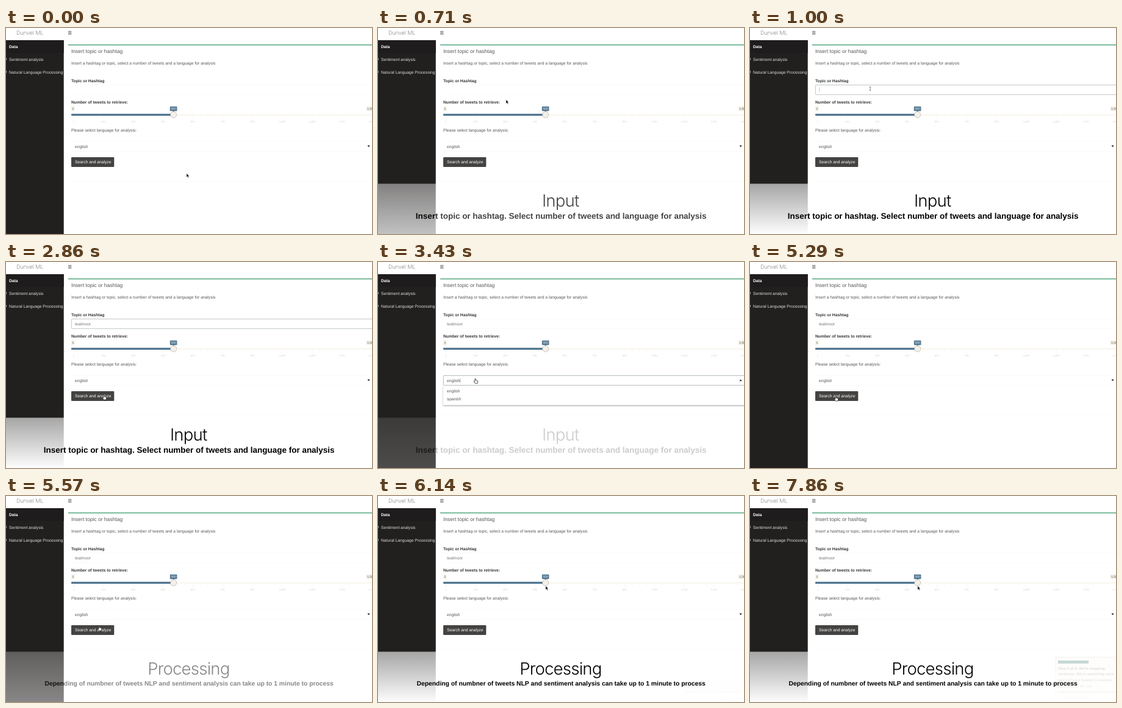
An HTML page that plays this animation: 600 px wide and 338 px high, repeating every 8000 ms.

```html
<!DOCTYPE html>
<html lang="en">
<head>
<meta charset="utf-8">
<title>Topic analysis</title>
<style>
  html, body { margin: 0; width: 100%; height: 100%; overflow: hidden; background: #fff; }
  svg { display: block; width: 100vw; height: 100vh; }
  text { font: 6.73px "Liberation Sans", Arial, sans-serif; fill: #555; text-rendering: geometricPrecision; white-space: pre; }
  .bold { font-weight: 700; fill: #333; }
  .side { fill: #ddd; }
  .tiny { font-size: 5px; }
  .mid { text-anchor: middle; }
  .thin { font-family: Inter, "Open Sans", sans-serif; font-weight: 200; }
  .headline { font-family: Inter, Roboto, sans-serif; font-weight: 300; font-size: 27.5px; letter-spacing: -.75px; fill: #000; text-anchor: middle; }
  .sub { font-weight: 700; fill: #000; text-anchor: middle; }
  .toast text { font-size: 6px; font-weight: 700; fill: #8a8474; }
</style>
</head>
<body>
<svg viewBox="0 0 600 338" preserveAspectRatio="none">
  <defs>
    <linearGradient id="veil" x2="0" y2="1">
      <stop offset="0" stop-color="#fff" stop-opacity=".6"/>
      <stop offset="1" stop-color="#fff" stop-opacity=".99"/>
    </linearGradient>
    <filter id="shadow" x="-5%" y="-20%" width="110%" height="160%">
      <feDropShadow dx="0" dy="1.5" stdDeviation="1.3" flood-opacity=".35"/>
    </filter>
  </defs>

  <rect width="600" height="338" fill="#fff"/>
  <rect y="20" width="94.7" height="318" fill="#22201f"/>
  <rect y="20" width="94.7" height="21" fill="#1e1c1c"/>
  <text class="thin" x="17" y="11.2" style="font-size:9px">Dunvel ML</text>
  <path d="M102 5.7h5.4M102 7.9h5.4M102 10.1h5.4" stroke="#444" stroke-width=".9"/>
  <text class="bold" x="5" y="33" style="fill:#fff">Data</text>
  <text class="side" x="5" y="54">Sentiment analysis</text>
  <text class="side" x="5" y="75">Natural Language Processing</text>
  <path d="M0 49.5v3M0 70.5v3" stroke="#ccc" stroke-width="1.6"/>

  <rect x="102" y="27" width="498" height="1.4" fill="#4ba276"/>
  <text x="107" y="40.6" style="font-size:8.5px">Insert topic or hashtag</text>
  <text x="107" y="59.6">Insert a hashtag or topic, select a number of tweets and a language for analysis</text>
  <path d="M102 252h498M107 93.5h493M107 109h493M107 186.3h493M107 202.3h493" stroke="#faf9f7" stroke-width=".8"/>

  <text class="bold" x="107" y="88.7">Topic or Hashtag</text>
  <rect id="focus" x="107.3" y="93.5" width="500" height="15.8" rx="1" fill="#fff" stroke="#b7c1c0" stroke-width=".9"/>
  <text id="topic" x="113" y="103.6" style="fill:#777"></text>
  <path id="caret" d="M113.5 97.5v7.5" stroke="#aaa" stroke-width=".6"/>

  <text class="bold" x="107" y="124">Number of tweets to retrieve:</text>
  <g id="ticks"></g>
  <rect x="107" y="141.2" width="500" height="2.2" fill="#fdfbf6" stroke="#f3eee2" stroke-width=".5"/>
  <rect x="107" y="140.7" width="168" height="3.2" rx="1" fill="#50758f"/>
  <rect x="107" y="128.7" width="5.6" height="7.6" rx="1" fill="#f1eee4"/>
  <text class="tiny" x="108.4" y="134.4">1</text>
  <rect x="590.5" y="128.7" width="16" height="7.6" rx="1" fill="#f3f0e6"/>
  <text class="tiny" x="592" y="134.4">1,500</text>
  <rect x="268.8" y="128.7" width="11.6" height="7.6" rx="1" fill="#50758f"/>
  <path d="M273.2 136h2.8l-1.4 1.8z" fill="#50758f"/>
  <text class="tiny mid" x="274.6" y="134.4" style="fill:#fff">500</text>
  <circle cx="274.7" cy="142.3" r="5" fill="#f4f1ea" stroke="#bbb7ab" stroke-width=".8"/>

  <text x="107" y="170.3">Please select language for analysis:</text>
  <text x="113" y="196.6">english</text>
  <path id="arrowDown" d="M592.4 192.8h4.4l-2.2 2.5z" fill="#111"/>
  <rect x="107" y="212" width="70.3" height="16" rx="1.2" fill="#444342"/>
  <text x="113" y="222.4" style="fill:#fff">Search and analyze</text>

  <g id="menu">
    <rect x="107" y="202" width="500" height="32.5" fill="#fff" filter="url(#shadow)"/>
    <rect x="107.3" y="186.3" width="500" height="16" rx="1" fill="#fff" stroke="#a9b2b1" stroke-width=".9"/>
    <text x="113" y="196.6">english</text>
    <path d="M134.6 191v7" stroke="#777" stroke-width=".6"/>
    <path d="M592.4 195.2h4.4l-2.2-2.5z" fill="#111"/>
    <text x="113" y="214.4">english</text>
    <text x="113" y="227">spanish</text>
  </g>

  <g id="toast1" class="toast"></g>
  <g id="toast2" class="toast"></g>

  <g id="inputCaption">
    <rect y="255.5" width="600" height="82.5" fill="url(#veil)"/>
    <text class="headline" x="299.2" y="292.6">Input</text>
    <text class="sub" x="300.2" y="313" style="font-size:13.47px">Insert topic or hashtag. Select number of tweets and language for analysis</text>
  </g>
  <g id="processCaption">
    <rect y="255.5" width="600" height="82.5" fill="url(#veil)"/>
    <text class="headline" x="299.4" y="292.6">Processing</text>
    <text class="sub" x="300.2" y="310.6" style="font-size:10.34px">Depending of numbner of tweets NLP and sentiment analysis can take up to 1 minute to process</text>
  </g>

  <g id="cursor">
    <path id="arrow" d="M0 0v6.4l1.5-1.3 1.1 2.4 1.1-.5-1.1-2.3h2z" fill="#000" stroke="#fff" stroke-width=".5"/>
    <path id="beam" d="M-1.4-3q1.4 0 1.4.8q0-.8 1.4-.8M0-2.4v4.8M-1.4 3q1.4 0 1.4-.8q0 .8 1.4.8" fill="none" stroke="#555" stroke-width=".7"/>
    <path id="hand" d="M-1.1-3.4q.7-.9 1.3.1v2.2l2.6.6q.9.3.8 1.4l-.5 3.2h-3.9l-2-2.8q-.3-1 .7-.8l1 .7z" fill="#fff" stroke="#111" stroke-width=".7" stroke-linejoin="round"/>
  </g>
</svg>
<script>
const LOOP = 8000;
const TOPIC = "tealmoor";
const $ = id => document.getElementById(id);
const clamp = v => Math.min(1, Math.max(0, v));
const ease = p => p * p * (3 - 2 * p);
const ramp = (t, from, to) => clamp((t - from) / (to - from));
const show = (id, on) => $(id).style.display = on ? "" : "none";
const within = (v, lo, hi) => v >= lo && v <= hi;

// time, x, y of the pointer
const route = [
  [0, 296, 238.5], [200, 296, 238.5], [860, 197, 99.5], [1860, 197, 99.5],
  [2290, 161, 222], [2900, 161, 222], [3290, 160, 195], [3450, 160, 195],
  [3720, 160, 224], [4150, 160, 224], [4430, 152, 212], [4570, 152, 212],
  [5000, 141, 224], [5500, 141, 224], [5880, 274.8, 147.5], [LOOP, 274.8, 147.5]
];

function pointerAt(t) {
  const i = route.findIndex(([end]) => end > t);
  const [t0, x0, y0] = route[i - 1], [t1, x1, y1] = route[i];
  const p = ease(ramp(t, t0, t1));
  return [x0 + (x1 - x0) * p, y0 + (y1 - y0) * p];
}

function buildTicks() {
  let out = "";
  for (let i = 0; i <= 40; i++) {
    const x = 111 + i * 12.22, major = i % 4 === 0;
    out += `<path d="M${x} 145v${major ? 4 : 2}" stroke="#f0ebe2" stroke-width=".5"/>`;
    if (major) {
      const value = Math.min(1500, 1 + i * 37.5).toLocaleString("en-US");
      out += `<text class="mid" x="${x}" y="154.6" style="font-size:4.4px;fill:#d8d2cc">${value}</text>`;
    }
  }
  $("ticks").innerHTML = out;
}

function buildToast(id, top, bar, lines) {
  $(id).innerHTML =
    `<rect x="501" y="${top}" width="110" height="${345 - top}" rx="1.5" fill="#fbf8f2" stroke="#d5d0c4" stroke-width=".8"/>
     <rect x="505" y="${top + 5.5}" width="${bar}" height="5" fill="#4f857c"/>` +
    lines.map((line, i) => `<text x="505" y="${top + 20.3 + i * 9.6}">${line}</text>`).join("");
}

function render(t) {
  const [x, y] = pointerAt(t);
  const menuOpen = within(t, 3400, 4500);
  const focused = within(t, 860, 3400);
  const typed = Math.round(TOPIC.length * ramp(t, 1150, 1570));
  const onButton = within(x, 107, 177) && within(y, 212, 228);
  const onSelect = within(y, 186, 202);
  const onInput = within(y, 93, 109);
  const hand = onButton || onSelect || menuOpen;

  show("focus", focused);
  show("caret", focused && typed === 0);
  $("topic").textContent = TOPIC.slice(0, typed);
  show("menu", menuOpen);
  show("arrowDown", !menuOpen);

  $("inputCaption").style.opacity = ramp(t, 250, 880) * (1 - ramp(t, 2900, 3560));
  $("processCaption").style.opacity = ramp(t, 5300, 5880);
  show("toast1", within(t, 5900, 6900));
  $("toast1").style.opacity = ramp(t, 5900, 6300);
  show("toast2", t > 6900);
  $("toast2").style.opacity = ramp(t, 6800, 7400);

  show("cursor", !within(t, 1200, 1800));
  $("cursor").setAttribute("transform", `translate(${x} ${y})`);
  show("hand", hand);
  show("beam", onInput);
  show("arrow", !hand && !onInput);
}

buildTicks();
buildToast("toast1", 303, 25, ["Step 1 of 4: We're connecting to", "Chirvel and retrieving your tweets"]);
buildToast("toast2", 264.5, 50, [
  "Step 2 of 4: We're mapping", "emotions. We're searching each", "word of your tweets in emotion",
  "lexicons, so we can", "categorize tweets by predominant", "emotion in them."
]);

const start = performance.now();
function frame() {
  render((performance.now() - start) % LOOP);
  requestAnimationFrame(frame);
}
frame();
</script>
</body>
</html>
```
